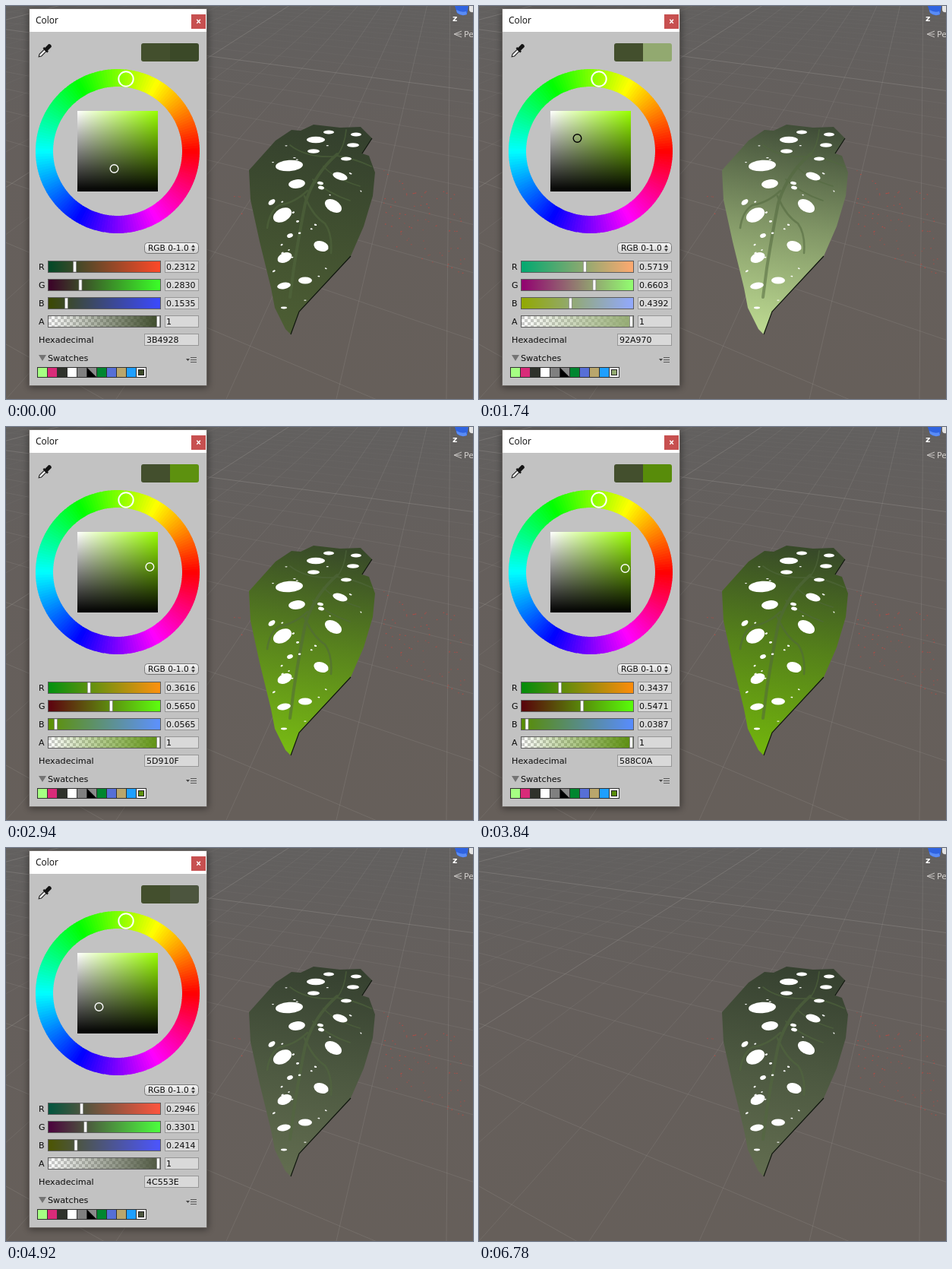
These frames come from a looping animation (615 by 517 pixels, 7680 ms). An HTML page:

```html
<!DOCTYPE html>
<html lang="en">
<head>
<meta charset="utf-8">
<title>Leaf colour picker</title>
<style>
html, body { margin: 0; width: 100%; height: 100%; overflow: hidden; background: #655f5b; }
svg { display: block; width: 615px; height: 517px; }
text { font: 11px "DejaVu Sans", sans-serif; fill: #0c0c0c; white-space: pre; }
</style>
</head>
<body>
<svg id="stage" viewBox="0 0 615 517" xmlns="http://www.w3.org/2000/svg">
  <defs>
    <linearGradient id="sky" x2="0" y2="1"><stop stop-color="#62605f"/><stop offset=".35" stop-color="#655f5c"/><stop offset="1" stop-color="#665f5a"/></linearGradient>
    <linearGradient id="leafFill" gradientUnits="userSpaceOnUse" x1="430" y1="155" x2="380" y2="425"><stop id="leafTop"/><stop id="leafMid" offset=".5"/><stop id="leafLow" offset="1"/></linearGradient>
    <linearGradient id="sat"><stop stop-color="#fff"/><stop offset="1" stop-color="#9f0"/></linearGradient>
    <linearGradient id="val" x2="0" y2="1"><stop stop-opacity="0"/><stop offset="1"/></linearGradient>
    <linearGradient id="button" x2="0" y2="1"><stop stop-color="#f6f6f6"/><stop offset="1" stop-color="#cfcfcf"/></linearGradient>
    <pattern id="check" width="8" height="8" x="56" y="408" patternUnits="userSpaceOnUse"><path d="M0 0h8v8h-8z" fill="#fff"/><path d="M0 0h4v4h-4zM4 4h4v4h-4z" fill="#ccc"/></pattern>
    <filter id="blur" x="-20%" y="-20%" width="140%" height="140%"><feGaussianBlur stdDeviation="5"/></filter>
    <clipPath id="leafClip"><use href="#leafShape"/></clipPath>
  </defs>

  <rect width="615" height="517" fill="url(#sky)"/>
  <g id="grid" stroke="#aaa6a2" stroke-width=".8"></g>
  <g id="dots" fill="#c8473f"></g>

  <g>
    <path d="M591 0L594 9Q600 14 607 11L609 0z" fill="#2f63e0"/>
    <path d="M594 9Q600 14 607 11L606 7Q600 9 593 5z" fill="#5a8cf5"/>
    <path d="M610 0h5v8q-4 1-5-3z" fill="#e4e4e4"/>
    <text x="588" y="20" style="font-weight:bold;fill:#fff">z</text>
    <path d="M600 33L590 37L600 41M591 37H600" fill="none" stroke="#c9c6c3"/>
    <text x="603" y="41" style="fill:#d2cfcc">Pe</text>
  </g>

  <path id="leafShape" d="M376 163L388 164L405 156L440 160L467 159L482 174L469 194L478 197L486 219L483 250L471 290L454 329L386 402L375 432L368 425L354 397L349 371L334 310L322 255L320 216L355 177z" fill="url(#leafFill)"/>
  <g clip-path="url(#leafClip)">
    <g fill="none" stroke="#52693f" stroke-linecap="round" opacity=".55">
      <path d="M436 195Q405 222 394 260Q386 300 379 345L374 383" stroke-width="4"/>
      <path d="M397 243Q380 259 360 262Q347 270 344 292M393 250Q404 276 420 286Q430 300 428 325" stroke-width="2.6"/>
      <path d="M432 198Q396 200 374 183M418 211Q432 227 466 237M436 197Q446 184 448 163M404 228Q423 246 453 256M436 197Q460 201 481 211" stroke-width="1.8"/>
    </g>
    <g id="spots" fill="#fff"></g>
  </g>
  <path d="M469 194L482 174M454 329L386 402L375 432" fill="none" stroke="#10170e" stroke-width="1.2"/>

  <g id="panel">
    <rect x="30" y="6" width="236" height="496" fill="#000" opacity=".42" filter="url(#blur)"/>
    <rect x="31" y="4" width="233" height="495" fill="#c2c2c2"/>
    <rect x="31" y="4" width="233" height="30" fill="#fff"/>
    <rect x="30.5" y="3.5" width="234" height="496" fill="none" stroke="#77716d" stroke-width=".7"/>
    <text x="39" y="23" style="font:12px 'Open Sans',sans-serif">Color</text>
    <rect id="close" x="244" y="11" width="19" height="19"/>
    <path d="M251.3 17.8l4.6 5M255.9 17.8l-4.6 5" stroke="#fff" stroke-width="1.4"/>

    <g transform="translate(51 59) rotate(45)">
      <path d="M-1.8 -1V8L0 11L1.8 8V-1z" fill="#eee" stroke="#222" stroke-width="1.1"/>
      <path d="M-4 -3h8v2.5h-8zM-2.6 -10q2.6-2.5 5.2 0v7h-5.2z" fill="#151515"/>
    </g>
    <path d="M216 49H181q-3 0-3 3v18q0 3 3 3h35z" fill="#434f2d"/>
    <path id="now" d="M216 49h35q3 0 3 3v18q0 3-3 3h-35z"/>

    <g id="ring" fill="none" stroke-width="23"></g>
    <circle cx="158" cy="96" r="9.7" fill="none" stroke="#fff" stroke-width="2"/>
    <rect x="94" y="138" width="106" height="106" fill="url(#sat)"/>
    <rect x="94" y="138" width="106" height="106" fill="url(#val)"/>
    <circle id="pick" r="5.3" fill="none" stroke-width="1.4"/>

    <rect x="182.5" y="311.5" width="71" height="14" rx="4" fill="url(#button)" stroke="#777"/>
    <text x="187" y="322" style="font-size:10.6px">RGB 0-1.0</text>
    <path d="M244 317.5l2.5-3.5l2.5 3.5zM244 319.5l2.5 3.5l2.5-3.5z" fill="#333"/>

    <g id="sliders"></g>

    <text x="43" y="443" style="font-size:11.2px">Hexadecimal</text>
    <rect x="182.5" y="431.5" width="71" height="15" fill="#d9d9d9" stroke="#979797"/>
    <text id="hex" x="185" y="443"></text>
    <path d="M43 459h10l-5 8z" fill="#747474"/>
    <text x="55" y="467" style="font-size:11.2px">Swatches</text>
    <path d="M237 464h5l-2.500 3z" fill="#444"/>
    <path d="M243 462.5h8M243 465.5h8M243 468.5h8" stroke="#555"/>
    <g id="swatches"></g>
  </g>
</svg>
<script>
const LOOP = 7680, STEP = 60;
const $ = id => document.getElementById(id);

function add(parent, tag, attrs) {
  const el = document.createElementNS('http://www.w3.org/2000/svg', tag);
  for (const k in attrs) el.setAttribute(k, attrs[k]);
  return parent.appendChild(el);
}

function set(id, attrs) {
  for (const k in attrs) $(id).setAttribute(k, attrs[k]);
}

function seeded(seed) {
  return () => (seed = seed * 16807 % 2147483647) / 2147483647;
}

// Ground grid: two families of lines, each meeting in its vanishing point.
function drawGrid() {
  const line = (x1, y1, x2, y2, opacity) => add($('grid'), 'line', { x1, y1, x2, y2, opacity });
  const fade = (n, major) => major ? 0.36 : Math.max(0.06, 0.26 - n * 0.016);
  for (let k = -2; k < 25; k++)
    line(586, -137, 580 - 145 * k, 517, fade(Math.abs(k), k % 10 === 7));
  for (let n = 0; n < 25; n++)
    line(-960, -95, 640, -95 + 1600 / (1.778 + 0.585 * n), fade(n, n === 10));
}

function drawDots() {
  const rand = seeded(11);
  for (let i = 0; i < 85; i++) {
    const far = i > 80;
    const x = far ? 290 + 20 * rand() : 497 + 106 * rand();
    const y = far ? 250 + 33 * rand() : 214 + 100 * rand() + (x - 497) * 0.36;
    add($('dots'), 'rect', { x, y, width: 1.5, height: 1.1, opacity: 0.35 + 0.55 * rand() });
  }
}

// Spots given by centre and half width; they turn rounder and tilt away from the midrib mid-leaf.
const SPOTS = [
  [425, 166, 7], [461, 169, 7], [408, 176, 12], [457, 183, 8], [405, 191, 8], [448, 201, 7],
  [373, 210, 18], [440, 224, 10], [383, 234, 11], [414, 233, 4], [415, 239, 4], [431, 263, 12],
  [350, 258, 5], [364, 275, 13], [374, 302, 4], [367, 331, 10], [415, 316, 10], [394, 361, 9],
  [366, 368, 9], [366, 397, 4]
];

function drawSpots() {
  const spot = (cx, cy, rx) => {
    const bulge = Math.max(0, Math.sin(Math.PI * (cy - 200) / 190));
    add($('spots'), 'ellipse', { cx, cy, rx, ry: rx * (0.35 + 0.33 * bulge),
      transform: `rotate(${(cx - 395) * bulge} ${cx} ${cy})` });
  };
  SPOTS.forEach(s => spot(...s));
  const rand = seeded(5);
  for (let i = 0; i < 30; i++) spot(328 + 152 * rand(), 165 + 235 * rand(), 1.2 + 0.9 * rand());
}

function drawRing() {
  const at = deg => {
    const a = deg * Math.PI / 180;
    return `${147 + 96.5 * Math.cos(a)} ${191 - 96.5 * Math.sin(a)}`;
  };
  for (let h = 0; h < 360; h += 2)
    add($('ring'), 'path', { d: `M${at(h)}A96.5 96.5 0 0 0 ${at(h + 2.4)}`, stroke: `hsl(${h + 1},100%,50%)` });
}

function drawSliders() {
  const box = $('sliders');
  [...'RGBA'].forEach((name, i) => {
    const y = 335 + 24 * i;
    const grad = add(box, 'linearGradient', { id: 'grad' + name });
    add(grad, 'stop', { id: 'from' + name });
    add(grad, 'stop', { id: 'to' + name, offset: 1 });
    add(box, 'text', { x: 43, y: y + 12 }).textContent = name;
    if (name === 'A') add(box, 'rect', { x: 55, y, width: 149, height: 16, fill: 'url(#check)' });
    add(box, 'rect', { x: 55.5, y: y + 0.5, width: 148, height: 15, fill: `url(#grad${name})`, stroke: '#5c5c5c' });
    add(box, 'rect', { id: 'thumb' + name, y: y + 1, width: 4, height: 14, fill: '#fff', stroke: '#777', 'stroke-width': 0.7 });
    add(box, 'rect', { x: 209.5, y: y + 0.5, width: 44, height: 15, fill: '#d9d9d9', stroke: '#979797' });
    add(box, 'text', { id: 'value' + name, x: 211, y: y + 12 });
  });
}

function drawSwatches() {
  const box = $('swatches');
  const colors = ['#a6ff83', '#d92b79', '#2f322b', '#fff', '#808080', '#8b8b8b', '#00862f', '#566fd6', '#b9a66c', '#1e9fff', '#fff'];
  colors.forEach((fill, i) =>
    add(box, 'rect', { x: 41.5 + 13 * i, y: 475.5, width: 13, height: 13, fill, stroke: '#303030' }));
  add(box, 'path', { d: 'M107 476V488H119z', fill: '#000' });
  add(box, 'rect', { id: 'chip', x: 174.5, y: 478.5, width: 7, height: 7, stroke: '#222' });
}

// Rests of the drag: arrival, departure, green, blue. Red follows from the fixed hue.
const RESTS = [
  [0, 0, .2830, .1535], [1020, 1740, .6603, .4392], [2220, 2460, .5849, .0965], [2940, 3420, .565, .0565],
  [3840, 3840, .5471, .0387], [4380, 4380, .4056, .1626], [4920, LOOP, .3301, .2414]
];

const mix = (a, b, p) => a + (b - a) * p;

function colorAt(t) {
  const i = RESTS.findIndex(r => r[1] >= t);
  const [arrive, , g1, b1] = RESTS[i], [, leave, g0, b0] = RESTS[Math.max(0, i - 1)];
  const p = t >= arrive ? 1 : (t - leave) / (arrive - leave);
  const g = mix(g0, g1, p), b = mix(b0, b1, p);
  return [mix(b, g, 0.6), g, b];
}

const byte = v => Math.min(255, Math.ceil(255 * v));
const css = c => `rgb(${c.map(byte)})`;
const SHADE = [.185, .23, .17];

function render(t) {
  const c = colorAt(t), [, g, b] = c, fill = css(c);

  const lit = p => ({ 'stop-color': css(c.map((v, i) => mix(SHADE[i], v * 1.28, p))) });
  set('leafTop', lit(0.1));
  set('leafMid', lit(0.58));
  set('leafLow', lit(1));

  const closing = t >= 6720;
  set('panel', { display: t >= 6780 ? 'none' : 'inline', opacity: closing ? 0.5 : 1,
    transform: closing ? 'translate(147.5 251.5) scale(.96) translate(-147.5 -251.5)' : '' });
  set('close', { fill: t >= 6180 ? '#e04343' : '#c75050' });
  set('now', { fill });
  set('chip', { fill });
  set('pick', { cx: 94 + 106 * (1 - b / g), cy: 244 - 106 * g, stroke: g > 0.57 ? '#000' : '#fff' });

  [...c, 1].forEach((v, i) => {
    const name = 'RGBA'[i];
    const end = x => css(c.map((w, j) => j === i ? x : w));
    set('from' + name, { 'stop-color': end(0), 'stop-opacity': i < 3 ? 1 : 0 });
    set('to' + name, { 'stop-color': end(1) });
    set('thumb' + name, { x: 55.5 + 143 * v });
    $('value' + name).textContent = i < 3 ? v.toFixed(4) : '1';
  });
  $('hex').textContent = c.map(v => byte(v).toString(16).padStart(2, '0')).join('').toUpperCase();
}

drawGrid();
drawDots();
drawSpots();
drawRing();
drawSliders();
drawSwatches();

const start = performance.now();
function tick(now) {
  const t = Math.max(0, now - start) % LOOP;
  render(Math.floor(t / STEP) * STEP);
  requestAnimationFrame(tick);
}
render(0);
requestAnimationFrame(tick);
</script>
</body>
</html>
```
